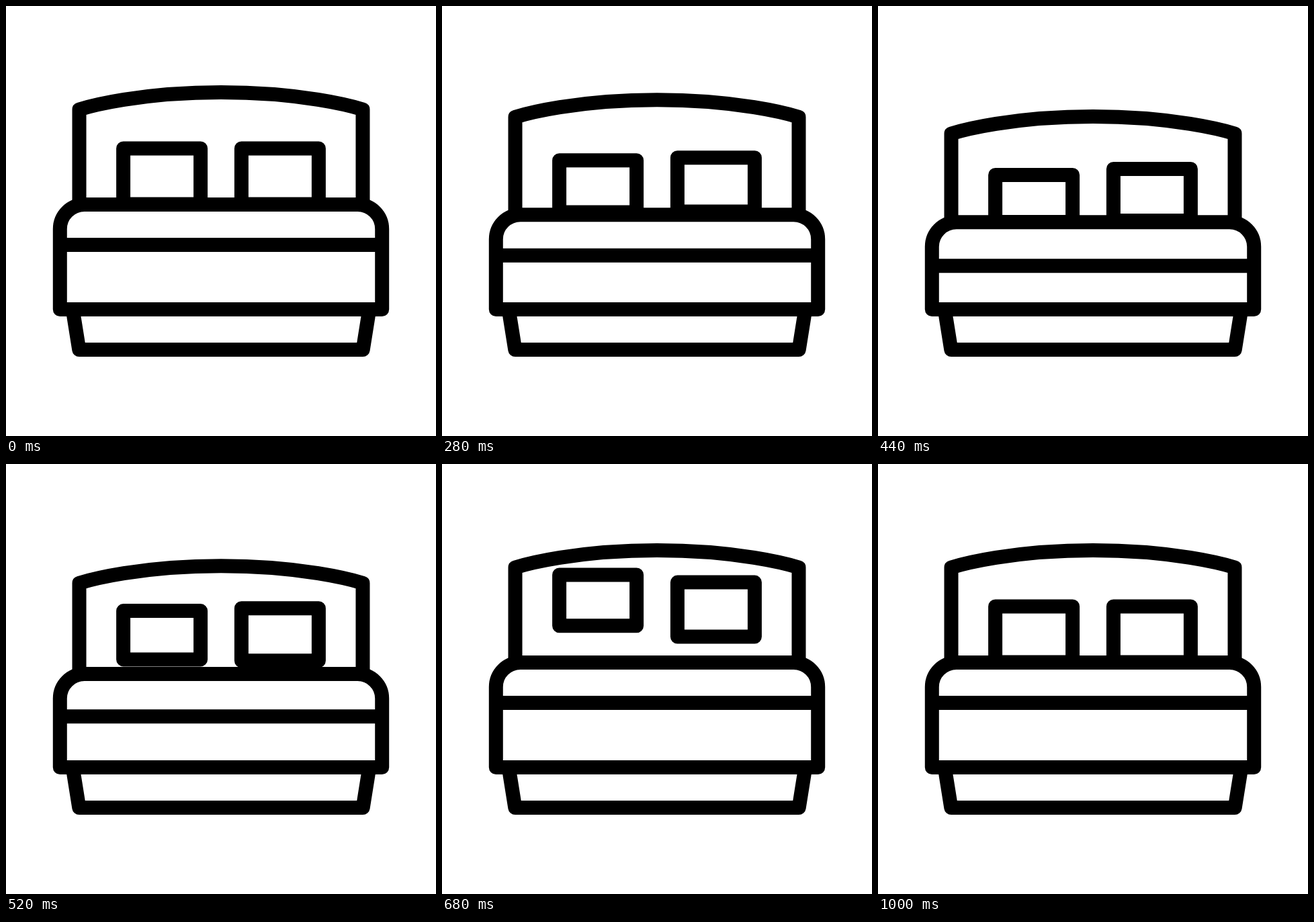
Write an HTML page with a canvas that moves like this. It is 640x640 px and loops after 1.48 s.

```html
<!DOCTYPE html>
<html lang="en">
<head>
<meta charset="utf-8">
<title>Bouncing bed</title>
<style>
  html, body { margin: 0; width: 100%; height: 100%; overflow: hidden; background: #fff; }
  canvas { display: block; width: 100vw; height: 100vh; }
</style>
</head>
<body>
<canvas id="stage" width="640" height="640"></canvas>
<script>
const ctx = document.getElementById('stage').getContext('2d');
const LOOP = 1480, STEP = 40;
const PRESS = 120, RELEASE = 440, APEX = 640, REST = 1000;
const LEFT = 80.3, RIGHT = 640 - LEFT, BASE = 451.5, FLOOR = 511.5;

// Eased progress from 0 to 1 between two times.
function ease(t, from, to) {
  const u = Math.min(1, Math.max(0, (t - from) / (to - from)));
  return u * u * (3 - 2 * u);
}

// Sinks by depth, then springs back.
function sink(t, depth, start, low) {
  return depth * (ease(t, start, low) - ease(t, RELEASE, APEX));
}

// Dips with the mattress, hops up, lands and settles.
function hop(t, dip, height, land, squash) {
  const moves = [
    [PRESS + 20, RELEASE, dip],
    [RELEASE, APEX, -height],
    [APEX, land, squash],
    [land, REST, 0]
  ];
  return moves.reduce((y, [from, to, goal]) => y + (goal - y) * ease(t, from, to), 0);
}

function line(...points) {
  ctx.beginPath();
  points.forEach(p => ctx.lineTo(...p));
  ctx.stroke();
}

function headboard(drop, foot) {
  const l = 109, r = 640 - l, side = 154 + drop, crown = 128.5 + drop;
  ctx.beginPath();
  ctx.moveTo(l, foot);
  ctx.lineTo(l, side);
  ctx.bezierCurveTo(l + 16, side - 5, l + 91, crown, 320, crown);
  ctx.bezierCurveTo(r - 91, crown, r - 16, side - 5, r, side);
  ctx.lineTo(r, foot);
  ctx.stroke();
}

function mattress(top) {
  const corner = 36.5;
  ctx.beginPath();
  ctx.moveTo(LEFT, BASE);
  ctx.arcTo(LEFT, top, RIGHT, top, corner);
  ctx.arcTo(RIGHT, top, RIGHT, BASE, corner);
  ctx.lineTo(RIGHT, BASE);
  ctx.closePath();
  ctx.fill();
  ctx.stroke();
}

function pillow(x, top, bottom) {
  ctx.strokeRect(x, 212 + top, 115, 83 + bottom - top);
}

function draw(t) {
  const top = 295.5 + sink(t, 26.3, PRESS, RELEASE - 30);
  const band = 355.5 + sink(t, 31.3, PRESS, RELEASE);
  ctx.fillStyle = '#fff';
  ctx.fillRect(0, 0, 640, 640);
  ctx.strokeStyle = '#000';
  ctx.lineWidth = 21;
  ctx.lineJoin = 'round';

  headboard(sink(t, 36, PRESS + 65, RELEASE), top);
  mattress(top);
  line([LEFT, band], [RIGHT, band]);
  line([99.2, BASE], [108.8, FLOOR], [531.2, FLOOR], [540.8, BASE]);

  pillow(174.6, hop(t, 39.5, 54, 840, 12.5), hop(t, 26.5, 60.5, 840, 0));
  pillow(350.4, hop(t, 30.5, 48.5, 760, 0), hop(t, 24.5, 51.3, 760, 0));
}

const start = performance.now();
function tick() {
  const t = (performance.now() - start) % LOOP;
  draw(Math.floor(t / STEP) * STEP);
  requestAnimationFrame(tick);
}
tick();
</script>
</body>
</html>
```
